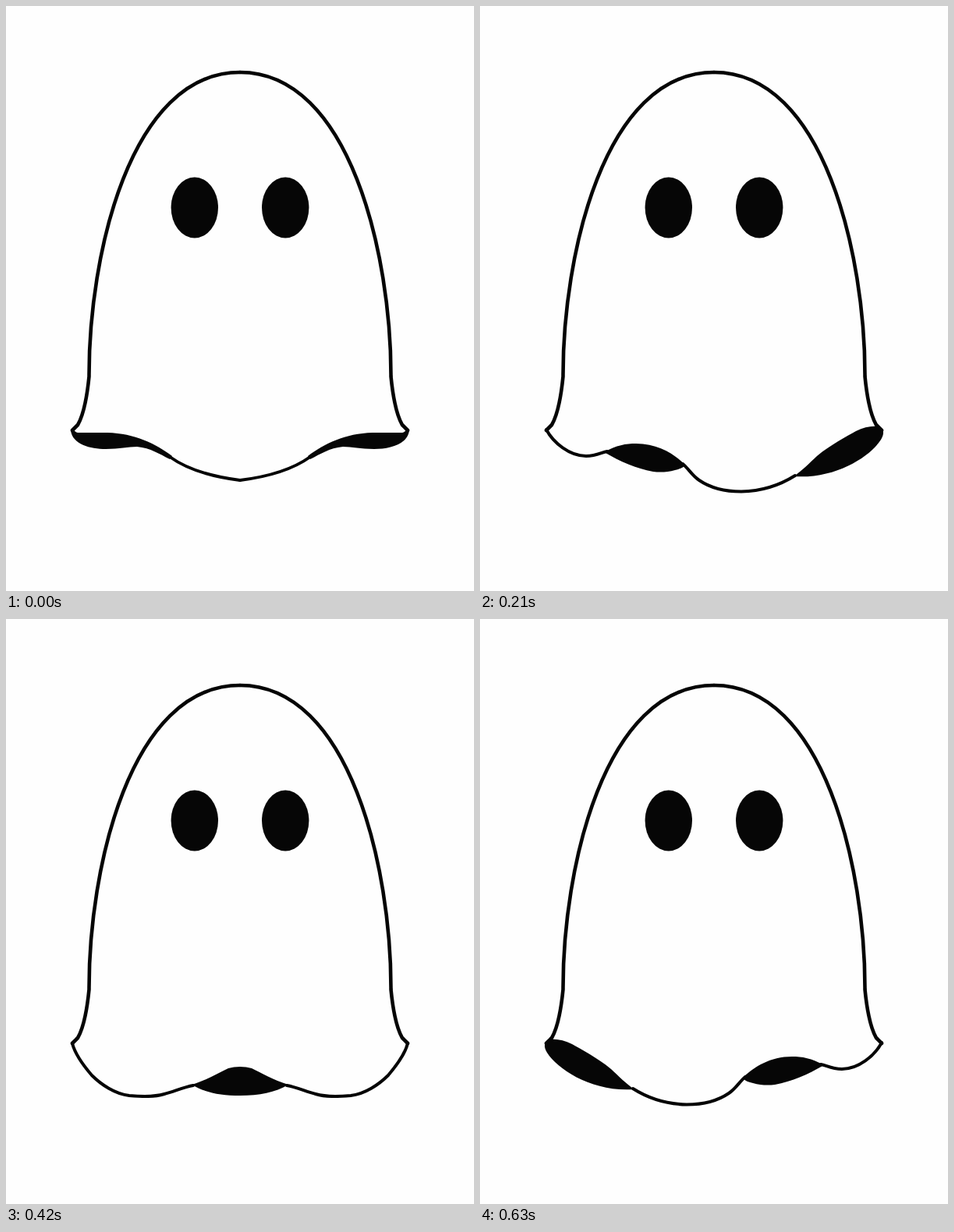
An HTML page that plays this animation: 600 px wide and 750 px high, repeating every 840 ms.

```html
<!DOCTYPE html>
<html lang="en">
<head>
<meta charset="utf-8">
<title>Ghost</title>
<style>
  html, body { margin: 0; height: 100%; overflow: hidden; background: #fefefe; }
  svg { display: block; width: 100%; height: 100%; }
  .line { fill: none; stroke: #050505; stroke-width: 4; stroke-linejoin: round; stroke-linecap: round; }
  .body { stroke-width: 4.6; }
  .fold, ellipse { fill: #060606; }
  .hem { display: none; }
</style>
</head>
<body>
<svg viewBox="0 0 600 750">
  <defs>
    <g id="side">
      <path class="line body" d="M300 85C159 85 106 320 106.500 475C104 500 99 525 92 537L85 544"/>
      <ellipse cx="241.800" cy="258.500" rx="30.200" ry="39"/>
    </g>
    <g id="raised">
      <path class="fold" d="M83 544C85 562 108 568 128 568C146 568 156 565 168 565C186 567 196 574 210 581L213 577C192 561 165 548 130 547L92 547Q88 546 87 543Z"/>
      <path class="line" d="M210 578C235 596 268 604 300 608"/>
    </g>
    <g id="sway">
      <path class="line" d="M85 543C94 560 115 577 136 577C150 577 156 572 163 571"/>
      <path class="fold" d="M159 572C175 563 187 561 200 561C228 561 248 574 262 587C263 591 258 593 250 595C240 598 230 598 222 597C200 593 180 584 159 572Z"/>
      <path class="line" d="M260 587C268 594 272 602 281 608C297 619 316 622.500 335 622.500C362 622 385 614 404 602"/>
      <path class="fold" d="M402 603C413 596 423 585 432 577C450 562 470 552 482 545C492 540 502 538 510 539C518 541 519 548 514 556C500 578 455 607 402 603Z"/>
    </g>
    <g id="lowered">
      <path class="line" d="M85 544C88 556 98 571 110 585C122 597 140 609 158 611C176 612.500 190 613 203 609C215 606 228 600 240 598"/>
      <path class="fold" d="M238 597C258 591 272 582 285 576Q292 574 300 574V611C275 611 255 607 238 597Z"/>
    </g>
  </defs>
  <use href="#side"/>
  <use href="#side" transform="matrix(-1 0 0 1 600 0)"/>
  <g class="hem">
    <use href="#raised"/>
    <use href="#raised" transform="matrix(-1 0 0 1 600 0)"/>
  </g>
  <g class="hem"><use href="#sway"/></g>
  <g class="hem">
    <use href="#lowered"/>
    <use href="#lowered" transform="matrix(-1 0 0 1 600 0)"/>
  </g>
  <g class="hem"><use href="#sway" transform="matrix(-1 0 0 1 600 0)"/></g>
</svg>
<script>
  const STEP = 210;
  const hems = document.querySelectorAll('.hem');
  const start = performance.now();

  function draw(now) {
    const pose = Math.floor(Math.max(0, now - start) / STEP) % hems.length;
    hems.forEach((hem, i) => { hem.style.display = i === pose ? 'inline' : 'none'; });
    requestAnimationFrame(draw);
  }
  draw(start);
</script>
</body>
</html>
```
